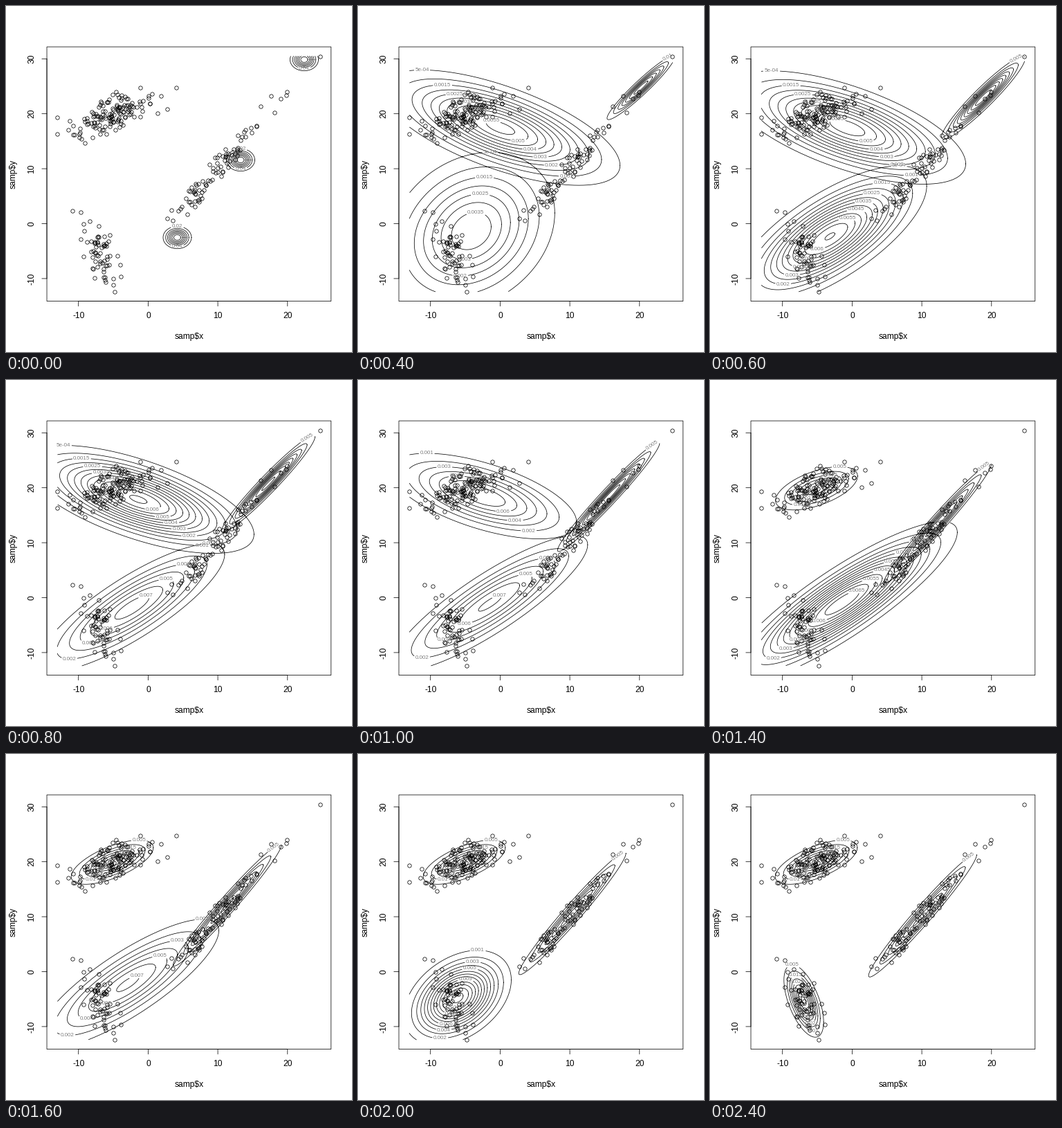
A matplotlib script that plays this animation: 500x500 px, repeating every 2.6 s.

```python
import math

import matplotlib.pyplot as plt
import numpy as np
from matplotlib.animation import FuncAnimation
from matplotlib.patches import Rectangle

SIZE, DPI, TICK_MS, TICKS = 500, 100, 200, 13
PX = 72 / DPI                                   # one pixel in points
LW = .75 * PX
X0, Y0, SX, SY = 205.4, 314.5, 10.07, 7.94      # data to pixel scale
LEFT, RIGHT, TOP, BOTTOM = 74.25, 454.55, 72.65, 412.95
GREY = "#808080"

plt.rcParams["font.family"] = "Liberation Sans"
plt.rcParams["path.snap"] = False


def spread(sx, sy, r):
    return np.array([[sx * sx, r * sx * sy], [r * sx * sy, sy * sy]])


def cluster(rng, n, mean, cov, edge):
    """The edge points plus a random core; together they have this mean and cov."""
    mean, edge = np.array(mean), np.array(edge)
    k = n - len(edge)
    mid = (n * mean - edge.sum(0)) / k
    d, e = edge - mean, mid - mean
    rest = (n * cov - d.T @ d) / k - np.outer(e, e)
    z = rng.normal(size=(4 * k, 2))
    z = z[np.hypot(*z.T) < 2.1][:k]
    z -= z.mean(0)
    z = np.linalg.solve(np.linalg.cholesky(np.cov(z.T, bias=True)), z.T).T
    return np.vstack([edge, mid + z @ np.linalg.cholesky(rest).T])


def sample():
    rng = np.random.default_rng(12)
    lower = cluster(
        rng, 65, (-6.94, -5.35), spread(1.35, 3.12, -.58),
        [(-10.9, 2.3), (-9.7, 2.1), (-9.2, -1.3), (-4.8, -12.4),
         (-3.9, -9.6), (-4, -7.5), (-4.4, -5.8), (-5, -11.1)])
    upper = cluster(
        rng, 145, (-5.15, 19.92), spread(3.01, 2.055, .653),
        [(-13, 16.3), (-13, 19.3), (-11.5, 17.1), (-9.1, 14.7),
         (-10.6, 16.2), (-11.3, 18.7), (-9.9, 16.3), (4.05, 24.7),
         (2.75, 20.9), (1.4, 20.1), (1.85, 23.2), (.3, 21.8)])
    ridge = cluster(
        rng, 90, (10.12, 10.26), spread(4.02, 5.82, .977),
        [(24.73, 30.46), (19.9, 24), (19.8, 23.4), (19, 22.7),
         (18.1, 20.2), (17.6, 23.2), (16.1, 21.3)])
    return np.vstack([lower, upper, ridge])


def density(pts, mean, cov):
    d = pts - mean
    q = np.einsum("ij,jk,ik->i", d, np.linalg.inv(cov), d)
    return np.exp(-q / 2) / (2 * math.pi * math.sqrt(np.linalg.det(cov)))


def fit_steps(pts, starts, count):
    """Expectation-maximisation of a Gaussian mixture, one entry per step."""
    mix = [(1 / len(starts), np.array(s), np.eye(2)) for s in starts]
    steps = [mix]
    for _ in range(count):
        share = np.array([w * density(pts, m, c) for w, m, c in mix]) + 1e-300
        share /= share.sum(0)
        mix = []
        for s in share:
            mean = s @ pts / s.sum()
            d = pts - mean
            mix.append((s.mean(), mean, (d.T * s) @ d / s.sum()))
        steps.append(mix)
    return steps


def ring_levels(peak):
    """About ten round levels between zero and the peak."""
    cell = peak / 10
    base = 10 ** math.floor(math.log10(cell))
    unit = base
    for k, h in ((2, 1.5), (5, 2.75), (10, 1.5)):
        if k * base - cell >= h * (cell - unit):
            break
        unit = k * base
    return [i * unit for i in range(1, 20) if i * unit < peak]


def to_px(x, y):
    return X0 + SX * x, Y0 - SY * y


def inside(x, y):
    return (x >= LEFT) & (x <= RIGHT) & (y >= TOP) & (y <= BOTTOM)


def rings(mean, cov):
    """Ring outlines with gaps, and the labels that sit in the gaps."""
    root = np.linalg.cholesky(cov)
    peak = 1 / (2 * math.pi * math.sqrt(np.linalg.det(cov)))
    r = cov[0, 1] / math.sqrt(cov[0, 0] * cov[1, 1])
    narrow = r > .9
    flat = math.acos(r) + (math.radians(19) if narrow else 0)
    t = np.linspace(0, 2 * math.pi, 721)
    lines, labels = [], []

    def at(m, a):
        u = m * root @ np.array([np.cos(a), np.sin(a)])
        return to_px(mean[0] + u[0], mean[1] + u[1])

    for i, level in enumerate(ring_levels(peak)):
        m = math.sqrt(2 * math.log(peak / level))
        x, y = at(m, t)
        keep = inside(x, y)
        text = f"{level:.0e}" if level < .00095 else f"{level:.4g}"
        half = 2.1 * len(text) + 1
        a = flat + math.pi * (i % 2)            # top and bottom in turn
        lx, ly = at(m, a)
        fits = m * root[0, 0] * SX > half and not (narrow and i)
        free = all(math.hypot(lx - p[0], ly - p[1]) > 9 for p in labels)
        if fits and free and inside(lx, ly):
            (ax0, ay0), (bx, by) = at(m, a + .01), at(m, a - .01)
            slope = math.atan((by - ay0) / (bx - ax0))
            u = (x - lx) * math.cos(slope) + (y - ly) * math.sin(slope)
            v = (y - ly) * math.cos(slope) - (x - lx) * math.sin(slope)
            keep &= ~((abs(u) < half) & (abs(v) < 4))
            labels.append((lx, ly, text, -math.degrees(slope)))
        lines.append(np.column_stack([np.where(keep, x, np.nan),
                                      np.where(keep, y, np.nan)]))
        lines.append([[np.nan, np.nan]])
    return lines, labels


fig = plt.figure(figsize=(SIZE / DPI, SIZE / DPI), dpi=DPI, facecolor="white")
ax = fig.add_axes([0, 0, 1, 1])
ax.set_xlim(0, SIZE)
ax.set_ylim(SIZE, 0)
ax.axis("off")


def stroke(xs, ys):
    ax.plot(xs, ys, color="black", lw=LW, solid_capstyle="round")


def write(x, y, text, size=12, color="black", angle=0):
    return ax.text(x, y, text, fontsize=size * PX, color=color, rotation=angle,
                   rotation_mode="anchor", ha="center", va="center", zorder=4)


ax.add_patch(Rectangle((59.04, 59.04), 410.72, 367.52,
                       fill=False, ec="black", lw=LW))
for v in range(-10, 40, 10):
    px, py = to_px(v, v)
    if v < 30:
        stroke([px, px], [426.56, 433.76])
        write(px, 448, str(v))
    stroke([51.84, 59.04], [py, py])
    write(37.5, py, str(v), angle=90)
stroke([to_px(-10, 0)[0], to_px(20, 0)[0]], [426.56, 426.56])
stroke([59.04, 59.04], [to_px(0, -10)[1], to_px(0, 30)[1]])
write(264.7, 477.7, "samp$x")
write(10.3, 242.5, "samp$y", angle=90)

points = sample()
steps = fit_steps(points, [(4.18, -2.52), (13.27, 11.59), (22.4, 29.85)],
                  TICKS - 2)
ax.plot(*to_px(*points.T), "o", ms=5.4 * PX, mfc="none", mec="black", mew=LW)
curves, = ax.plot([], [], color="black", lw=LW, zorder=3)
shown = []


def update(tick):
    while shown:
        shown.pop().remove()
    paths = []
    for _, mean, cov in steps[max(0, tick - 1)]:    # the start holds two ticks
        lines, labels = rings(mean, cov)
        paths += lines
        for x, y, text, angle in labels:
            shown.append(write(x, y, text, 8, GREY, angle))
    curves.set_data(*np.vstack(paths).T)
    return [curves, *shown]


anim = FuncAnimation(fig, update, frames=TICKS, interval=TICK_MS,
                     init_func=lambda: update(0), repeat=True,
                     repeat_delay=0, blit=False)
plt.show()
```
